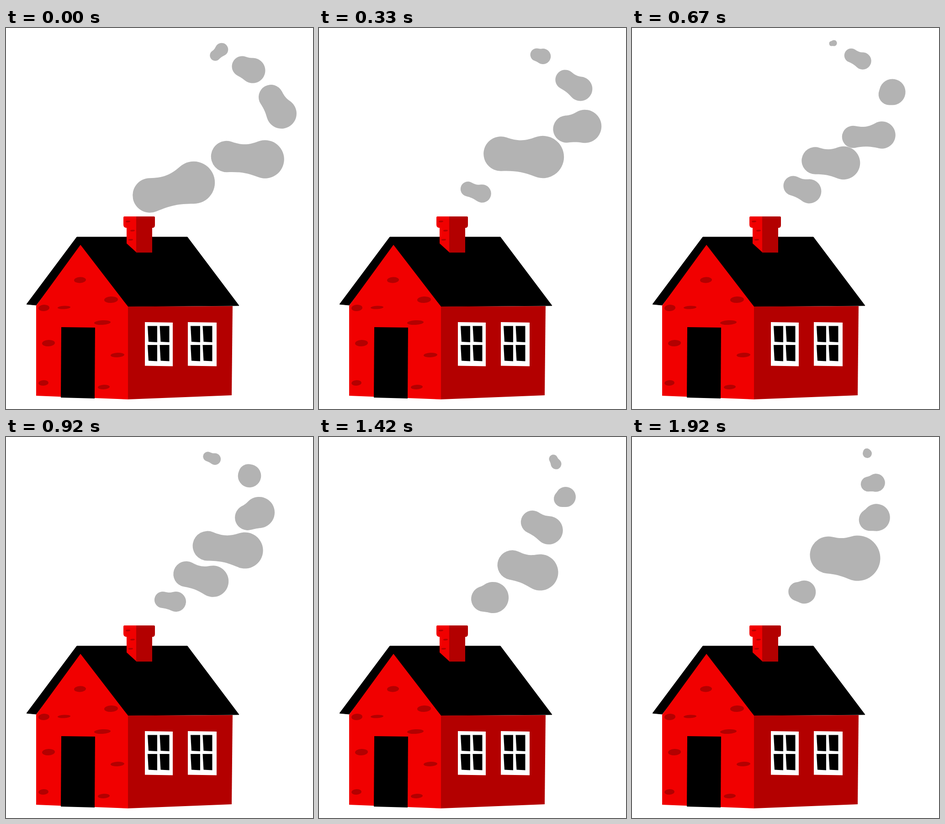
Animation, 672 px wide and 833 px high, one loop 2010 ms. Source, as an HTML page:

```html
<!DOCTYPE html>
<html lang="en">
<head>
<meta charset="utf-8">
<title>House with smoke</title>
<style>
  html, body { margin: 0; width: 100%; height: 100%; overflow: hidden; background: #fff; }
  svg { display: block; width: 100%; height: 100%; }
</style>
</head>
<body>
<svg viewBox="0 0 672 833">
  <g id="smoke" fill="#b3b3b3"></g>

  <path stroke="#000" stroke-linejoin="round" d="M155 457H397L400 461L510 607L267 609L163 480L66 606L45 604Z"/>
  <path fill="#b30000" d="M266 609L496 608L494 803L266 812Z"/>
  <path fill="#f10000" d="M163 474L267 609V812L66 804V607Z"/>
  <path d="M121 654L195 655L194 810L120 808Z"/>

  <path fill="#f10000" d="M259 412H286V491L264 471V437Q257 437 257 430V415Q257 412 259 412Z"/>
  <path fill="#b30000" d="M285 412H324Q326 412 326 415V431Q326 437 320 437V491H285Z"/>

  <g id="bricks" fill="#b30000"></g>
  <g id="windows"></g>
</svg>

<script>
const LOOP = 2010, LAST_STEP = 23;
const layer = id => document.getElementById(id);

function add(parent, tag, attrs = {}) {
  const node = document.createElementNS('http://www.w3.org/2000/svg', tag);
  for (const key in attrs) node.setAttribute(key, attrs[key]);
  return parent.appendChild(node);
}

function brick(cx, cy, rx, ry) {
  add(layer('bricks'), 'ellipse', { cx, cy, rx, ry, transform: `rotate(-3 ${cx} ${cy})` });
}
brick(162, 551, 13, 6.5); brick(230, 594, 15, 7); brick(83, 612, 12, 7);
brick(127, 611, 14, 3.5); brick(211, 644, 18, 5); brick(93, 689, 14, 7);
brick(244, 715, 15, 5);   brick(82, 776, 11, 6);  brick(214, 785, 13, 5);
for (const [i, x] of [267, 277, 273].entries()) brick(x, 423 + i * 20, 5, 1.7);

function windowAt(x, width) {
  add(layer('windows'), 'path', { fill: '#fff', d: `M${x} 643l${width} 1v95.5l${-width} -1Z` });
  for (const px of [x + 6, x + 32.5])
    for (const py of [651.5, 693])
      add(layer('windows'), 'path', { d: `M${px} ${py}h21v35.5l-19 -1Z` });
}
windowAt(304, 61);
windowAt(398, 63);

// A puff is two lobes joined by a waist; each pose is [step, x1, y1, x2, y2, radius].
const BIRTH = [335, 376], DRIFT = [-16, -6], FADE_STEPS = 2, SPECK = .3;
const puffs = [];

// The same puff, shrunk around a point.
function speck([, x1, y1, x2, y2, r], step, x, y) {
  const dx = (x2 - x1) / 2 * SPECK, dy = (y2 - y1) / 2 * SPECK;
  return [step, x - dx, y - dy, x + dx, y + dy, r * SPECK];
}

// Puffs that appear during the loop grow out of the chimney; those that end drift off and shrink.
function puff(...poses) {
  const first = poses[0], last = poses[poses.length - 1];
  if (first[0] > 0) poses.unshift(speck(first, first[0] - FADE_STEPS, ...BIRTH));
  if (last[0] < LAST_STEP) {
    const [step, x1, y1, x2, y2] = last;
    poses.push(speck(last, step + FADE_STEPS, (x1 + x2) / 2 + DRIFT[0], (y1 + y2) / 2 + DRIFT[1]));
  }
  puffs.push({ poses, node: add(layer('smoke'), 'path') });
}

puff([0, 458, 60, 472, 47, 13]);
puff([0, 517, 84, 540, 93, 25], [8, 437, 34, 442, 33, 6]);
puff([0, 580, 151, 603, 187, 30], [4, 539, 113, 572, 133, 24],
     [8, 480, 60, 505, 72, 17], [14, 407, 31, 413, 31, 6]);
puff([0, 483, 281, 567, 287, 38], [4, 542, 221, 582, 215, 33], [8, 563, 145, 570, 140, 26],
     [11, 530, 80, 533, 85, 23], [14, 472, 46, 484, 54, 11]);
puff([0, 315, 366, 411, 338, 42], [4, 398, 275, 490, 282, 42], [8, 484, 238, 547, 234, 27],
     [11, 529, 176, 554, 165, 31], [17, 513, 48, 519, 59, 10.5]);
puff([4, 326, 352, 357, 362, 18], [8, 401, 290, 463, 295, 33], [11, 441, 238, 523, 248, 36],
     [17, 532, 135, 540, 131, 20], [23, 514, 33, 515, 36, 9]);
puff([8, 353, 345, 388, 357, 24], [14, 435, 251, 506, 269, 34],
     [17, 467, 186, 503, 204, 28], [23, 517, 103, 534, 100, 18]);
puff([11, 343, 356, 372, 360, 20], [14, 370, 332, 420, 343, 29],
     [17, 423, 280, 484, 296, 36], [23, 521, 181, 535, 176, 27]);
puff([17, 361, 354, 381, 351, 31], [23, 430, 258, 494, 265, 45]);
puff([23, 363, 338, 377, 339, 23]);

// Smooth interpolation between neighbouring poses; null when the puff is absent.
function poseAt(poses, step) {
  const end = poses.length - 1;
  if (step < poses[0][0] || step > poses[end][0]) return null;
  const i = Math.min(end - 1, poses.findLastIndex(p => p[0] <= step));
  const a = poses[i], b = poses[i + 1];
  const before = poses[Math.max(0, i - 1)], after = poses[Math.min(end, i + 2)];
  const span = b[0] - a[0], u = (step - a[0]) / span;
  const ease = u * u * (3 - 2 * u);
  return a.map((v, k) => {
    const slopeA = (b[k] - before[k]) / (b[0] - before[0]) * span;
    const slopeB = (after[k] - a[k]) / (after[0] - a[0]) * span;
    return v + (b[k] - v) * ease
      + slopeA * u * (1 - u) ** 2 - slopeB * u * u * (1 - u);
  });
}

// Two circles, the second a little larger, blended by curves tangent to both.
function bean([, x1, y1, x2, y2, radius]) {
  const r = Math.max(1, radius), r1 = r * .9, r2 = r * 1.1;
  const d = Math.hypot(x2 - x1, y2 - y1) || 1, tilt = Math.atan2(y2 - y1, x2 - x1);
  const side = Math.PI / 2 + Math.asin(Math.min(1, (r2 - r1) / d));
  const pinch = Math.min(1, d / (2 * r));
  const above = .35 * pinch, below = .2 * pinch;

  const on = (x, y, r, angle) => ({
    x: x + r * Math.cos(tilt + angle), y: y + r * Math.sin(tilt + angle),
    tx: -Math.sin(tilt + angle), ty: Math.cos(tilt + angle)
  });
  const xy = (p, reach = 0) => `${(p.x + p.tx * reach).toFixed(2)} ${(p.y + p.ty * reach).toFixed(2)}`;
  const join = (p, q) => {
    const reach = Math.hypot(q.x - p.x, q.y - p.y) * .4;
    return `C${xy(p, reach)} ${xy(q, -reach)} ${xy(q)}`;
  };
  const arc = (r, sweep, p) => `A${r} ${r} 0 ${+(sweep > Math.PI)} 1 ${xy(p)}`;

  const top1 = on(x1, y1, r1, -side + above), top2 = on(x2, y2, r2, -side - above);
  const low2 = on(x2, y2, r2, side + below), low1 = on(x1, y1, r1, side - below);
  const extra = above + below;
  return `M${xy(top1)}${join(top1, top2)}${arc(r2, 2 * side + extra, low2)}` +
    `${join(low2, low1)}${arc(r1, 2 * (Math.PI - side) + extra, top1)}Z`;
}

// Twelve drawings a second, on a clock of 10 ms.
function stepAt(ms) {
  let step = 0;
  while (step < LAST_STEP && Math.round((step + 1) * 25 / 3) * 10 <= ms) step++;
  return step;
}

let shown = -1;
function render(now) {
  const step = stepAt(now % LOOP);
  if (step === shown) return;
  shown = step;
  for (const { poses, node } of puffs) {
    const pose = poseAt(poses, step);
    node.setAttribute('d', pose ? bean(pose) : '');
  }
}

function tick() {
  render(performance.now());
  requestAnimationFrame(tick);
}
tick();
</script>
</body>
</html>
```
